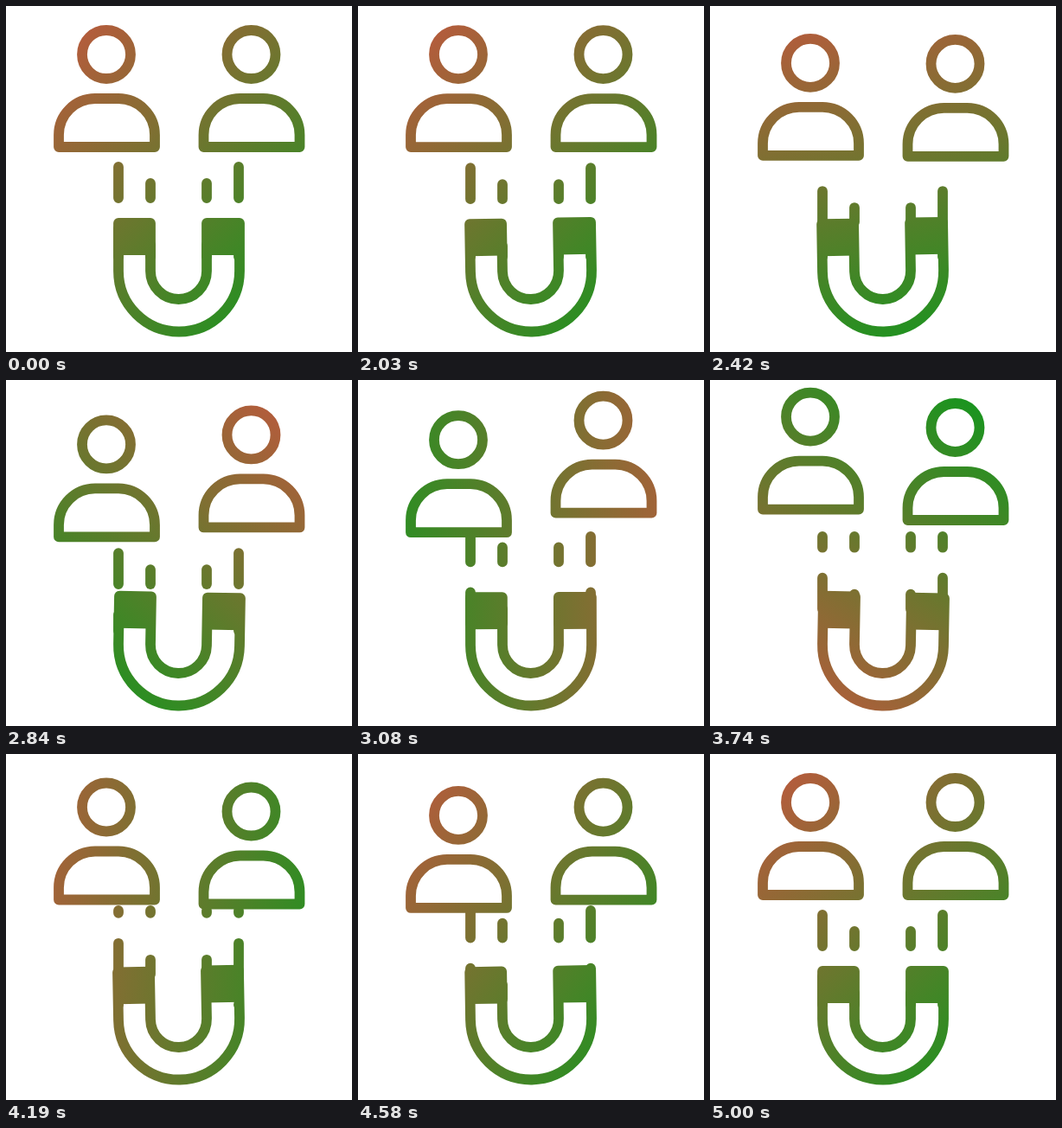
An HTML page without scripts that plays this animation: 400 by 400 pixels, repeating every 5.03 s.

```html
<!DOCTYPE html>
<html lang="en">
<head>
<meta charset="utf-8">
<title>Magnet attracting people</title>
<style>
  @property --flow { syntax: '<number>'; inherits: true; initial-value: 0; }
  @property --on { syntax: '<number>'; inherits: true; initial-value: 0; }
  @property --tilt { syntax: '<angle>'; inherits: false; initial-value: 0deg; }

  html, body { margin: 0; width: 100%; height: 100%; overflow: hidden; background: #fff; }
  svg {
    display: block; width: 100vw; height: 100vh;
    animation: flow 5.03s infinite, on 5.03s step-end infinite;
  }
  .ink { fill: none; stroke: #fff; stroke-width: 11.8; stroke-linecap: round; stroke-linejoin: round; }
  .solid { fill: #fff; }

  /* one full colour turn while the lines pass five times */
  .paint { transform-origin: 200px 200px; transform: rotate(calc(var(--flow) * 360deg)); }
  .long { stroke-dasharray: 36 35; stroke-dashoffset: calc(-5px - var(--flow) * 355px); }
  .short { stroke-dasharray: 17 54; stroke-dashoffset: calc(-24px - var(--flow) * 355px); }

  .left { animation: bob-left 5.03s ease-in-out infinite; }
  .right { animation: bob-right 5.03s ease-in-out infinite; }
  .magnet {
    transform-origin: 200px 306px;
    transform: rotate(calc(var(--tilt) * var(--on)));
    animation: shake 89.82ms -21ms ease-in-out infinite alternate;
  }

  @keyframes flow {
    0% { --flow: 0; }
    39.76% { --flow: 0; animation-timing-function: cubic-bezier(.4, .1, .7, .5); }
    66% { --flow: .515; animation-timing-function: cubic-bezier(.25, .4, .5, 1); }
    99.4%, 100% { --flow: 1; }
  }
  @keyframes on {
    0% { --on: 0; }
    39.76% { --on: 1; }
    99.4%, 100% { --on: 0; }
  }
  @keyframes shake {
    from { --tilt: 1.1deg; }
    to { --tilt: -1.1deg; }
  }
  @keyframes bob-left {
    0%, 39.76%, 99.4%, 100% { transform: translateY(0); }
    55.87% { transform: translateY(18.5px); }
    74.95% { transform: translateY(-13.5px); }
    89.26% { transform: translateY(16px); }
  }
  @keyframes bob-right {
    0%, 39.76%, 99.4%, 100% { transform: translateY(0); }
    52.29% { transform: translateY(14px); }
    64.81% { transform: translateY(-14px); }
    83.3% { transform: translateY(10.5px); }
  }
</style>
</head>
<body>
<svg viewBox="0 0 400 400">
  <defs>
    <linearGradient id="tint" gradientUnits="userSpaceOnUse" x1="58.6" y1="58.6" x2="341.4" y2="341.4">
      <stop stop-color="rgb(180,92,60)"/>
      <stop offset="1" stop-color="rgb(27,148,31)"/>
    </linearGradient>
    <g id="person">
      <circle cx="116" cy="56" r="28"/>
      <path d="M61 163V149A42 42 0 0 1 103 107H130A42 42 0 0 1 172 149V163Z"/>
    </g>
    <mask id="icon" maskUnits="userSpaceOnUse" x="0" y="0" width="400" height="400">
      <g class="ink">
        <g class="left"><use href="#person"/></g>
        <g class="right"><use href="#person" x="167.5"/></g>
        <path class="long" d="M130 181V290"/>
        <path class="short" d="M167 181V290"/>
        <path class="short" d="M232 181V290"/>
        <path class="long" d="M269 181V290"/>
        <g class="magnet">
          <path d="M130 251H167V306.5A32.5 32.5 0 0 0 232 306.5V251H270V306.5A70 70 0 0 1 130 306.5Z"/>
          <path class="solid" stroke="none" d="M130 251H167V288H130ZM232 251H270V288H232Z"/>
        </g>
      </g>
    </mask>
  </defs>
  <g mask="url(#icon)">
    <rect class="paint" x="-100" y="-100" width="600" height="600" fill="url(#tint)"/>
  </g>
</svg>
</body>
</html>
```
